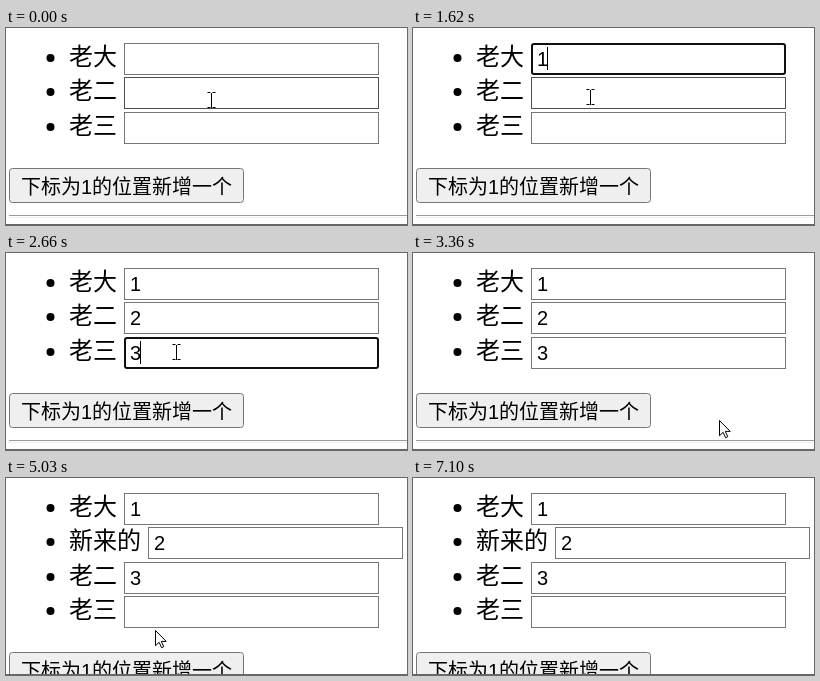
These frames come from a looping animation (401 by 197 pixels, 8030 ms). An HTML page:

```html
<!DOCTYPE html>
<html lang="zh">
<head>
<meta charset="utf-8">
<title>列表新增</title>
<style>
html, body { margin: 0; width: 100%; height: 100%; overflow: hidden; background: #fff; }
svg { display: block; }
.label { font: 24px "Noto Sans CJK SC", "Noto Sans CJK", sans-serif; }
.value { font: 20px "Liberation Sans", Arial, sans-serif; }
.button { font: 20px "Liberation Sans", "Noto Sans CJK SC", "Noto Sans CJK", sans-serif; }
</style>
</head>
<body>
<svg id="stage" width="401" height="197" viewBox="0 0 401 197"></svg>
<script>
const LOOP = 8030;
const TOPS = [15, 49, 84, 118];
const BEFORE = ['老大', '老二', '老三'];
const AFTER = ['老大', '新来的', '老二', '老三'];
const stage = document.getElementById('stage');

// Each step changes only the listed parts of the state.
const steps = [
  [0, { labels: BEFORE, values: '', focus: -1, hover: 1, over: false, beam: [205, 72], arrow: null }],
  [150, { beam: [196, 57] }],
  [270, { beam: [188, 45], hover: 0 }],
  [550, { beam: [188, 22] }],
  [920, { focus: 0 }],
  [1200, { beam: [191, 33] }],
  [1350, { values: '1' }],
  [1470, { beam: [193, 55], hover: 1 }],
  [1620, { beam: [177, 69] }],
  [1900, { focus: 1 }],
  [2020, { values: '12' }],
  [2140, { beam: [174, 90], hover: 2 }],
  [2290, { beam: [170, 99] }],
  [2410, { focus: 2 }],
  [2660, { values: '123' }],
  [2940, { beam: [178, 106] }],
  [3090, { beam: null, arrow: [243, 140], hover: -1 }],
  [3240, { arrow: [306, 167] }],
  [3360, { focus: -1 }],
  [3770, { arrow: [252, 165] }],
  [3920, { arrow: [190, 156], over: true }],
  [4040, { arrow: [152, 152] }],
  [4190, { arrow: [149, 152] }],
  [5030, { labels: AFTER, over: false }],
  [6830, { arrow: [172, 158] }],
  [6950, { arrow: [194, 165] }],
  [7100, { arrow: null }]
];

let last = {};
const states = steps.map(([time, change]) => [time, last = { ...last, ...change }]);

const rect = (x, y, w, h, fill, more = '') =>
  `<rect x="${x}" y="${y}" width="${w}" height="${h}" fill="${fill}" ${more}/>`;
const text = (x, y, kind, str) => `<text x="${x}" y="${y}" class="${kind}">${str}</text>`;
const outline = (x, y, w, h, fill, color, line, radius) =>
  rect(x + line / 2, y + line / 2, w - line, h - line, fill,
    `stroke="${color}" stroke-width="${line}" rx="${radius}"`);

function row(s, i) {
  const y = TOPS[i], x = 70 + 24 * s.labels[i].length;
  const value = s.values[i] || '';
  const focused = s.focus === i;
  const box = focused
    ? outline(x, y, 255, 32, '#fff', '#101010', 2, 2)
    : outline(x, y, 255, 32, '#fff', s.hover === i ? '#4f4f4f' : '#767676', 1, 0);
  const caret = focused ? rect(x + 6 + 11 * value.length - (value ? 1 : 0), y + 4, 1, 23, '#000') : '';
  return `<circle cx="44.5" cy="${y + 15}" r="4"/>` +
    text(63, y + 22, 'label', s.labels[i]) + box + text(x + 6, y + 23, 'value', value) + caret;
}

function button(y, over) {
  return outline(3, y, 235, 35, over ? '#e5e5e5' : '#efefef', over ? '#4f4f4f' : '#767676', 1, 3) +
    text(15, y + 26, 'button', '下标为1的位置新增一个');
}

const beam = ([x, y]) =>
  `<path d="M${x - 4 + .5} ${y - 7.5}h3m2 0h3M${x + .5} ${y - 7}v15M${x - 4 + .5} ${y + 7.5}h3m2 0h3" fill="none" stroke="#000"/>`;
const arrow = ([x, y]) =>
  `<path d="M${x + .5} ${y + .5}v15.2l3.6-3.4 2.5 5.4 2.2-1-2.5-5.3h4.9z" fill="#fff" stroke="#000"/>`;

function render(s) {
  const grown = s.labels.length > 3;
  const rule = rect(3, 187, 398, 1, '#9a9a9a') + rect(3, 189, 398, 1, '#eee');
  stage.innerHTML = s.labels.map((_, i) => row(s, i)).join('') +
    button(grown ? 174 : 140, s.over) + (grown ? '' : rule) +
    rect(0, 196, 401, 1, '#666') +
    (s.beam ? beam(s.beam) : '') + (s.arrow ? arrow(s.arrow) : '');
}

let shown;
function tick() {
  const t = performance.now() % LOOP;
  const state = states.filter(([time]) => time <= t).pop()[1];
  if (state !== shown) render(shown = state);
  requestAnimationFrame(tick);
}
tick();
</script>
</body>
</html>
```
